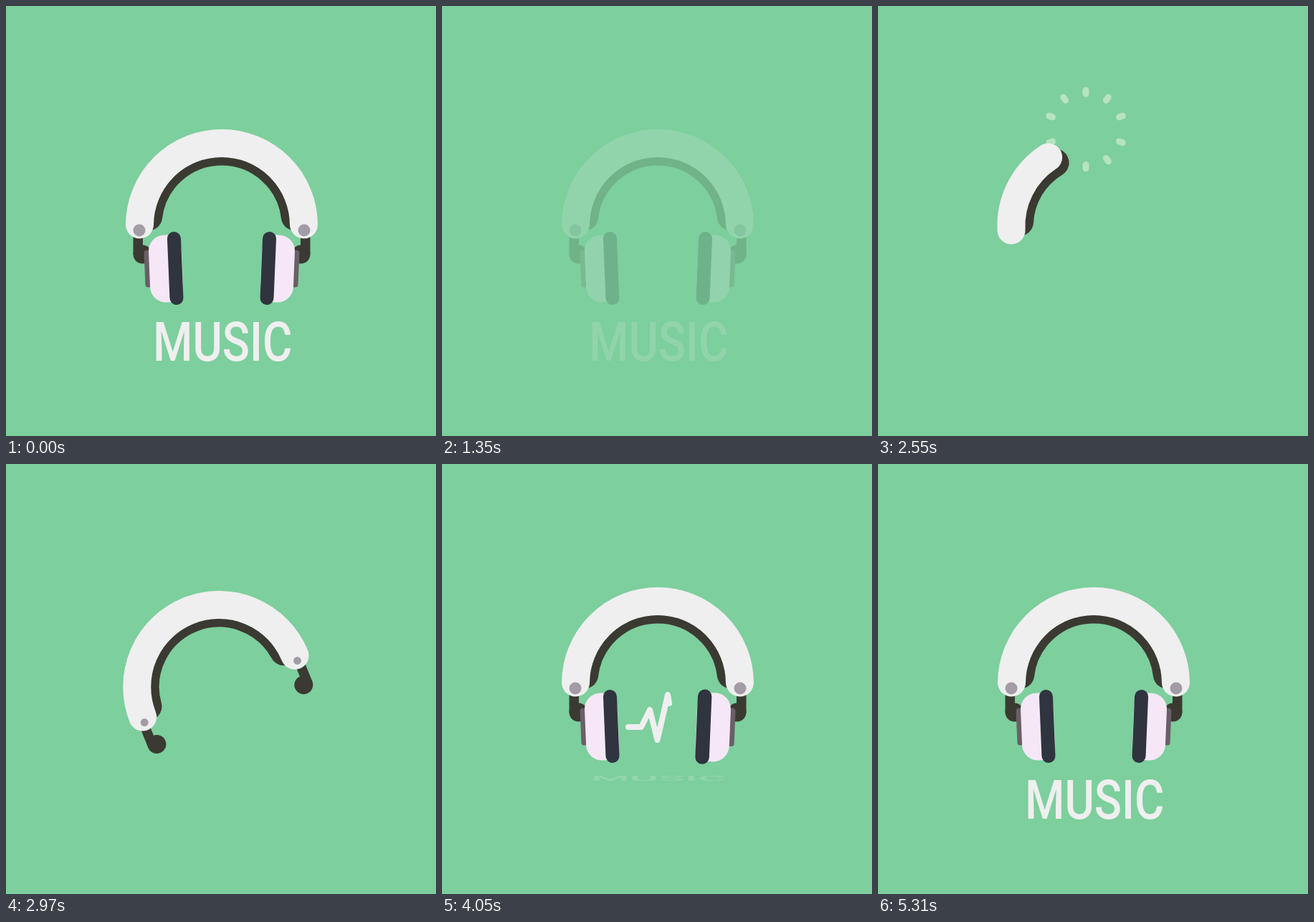
These frames come from a looping animation (600 px wide and 600 px high, 5340 ms). An HTML page:

```html
<!DOCTYPE html>
<html lang="en">
<head>
<meta charset="utf-8">
<title>Music</title>
<style>
  html, body { margin: 0; width: 100%; height: 100%; overflow: hidden; background: #7dcf9d; }
  svg { display: block; width: 100vw; height: 100vh; }
  .band { fill: none; stroke-width: 39; stroke-linecap: round; }
  .dark { stroke: #3b3a32; }
  .light { stroke: #efefef; }
  .wave { fill: none; stroke: #efefef; stroke-width: 8; stroke-linecap: round; stroke-linejoin: round; }
  #burst { stroke: #f0f7e4; stroke-width: 9; stroke-linecap: round; }
  text { font: 500 76.5px Roboto, "Open Sans", sans-serif; fill: #efefef; text-anchor: middle; }
</style>
</head>
<body>
<svg viewBox="0 0 600 600">
  <defs>
    <g id="leg" fill="#3b3a32">
      <rect x="177.5" y="305" width="13.5" height="42"/>
      <circle cx="190.5" cy="346.5" r="13"/>
    </g>
    <circle id="pin" cx="186" cy="313" r="8.5" fill="#a29ca6"/>
    <g id="cup" transform="rotate(-2.4 236 366)">
      <rect x="193.5" y="339" width="16" height="52" rx="4" fill="#6a5f68"/>
      <rect x="200" y="319" width="46" height="94" rx="22" fill="#f5e7f6"/>
      <rect x="226.7" y="315" width="19" height="102" rx="9.5" fill="#2f343f"/>
    </g>
  </defs>
  <g id="all">
    <g id="burst"></g>
    <g id="swing">
      <g id="legs">
        <use href="#leg"/>
        <use href="#leg" transform="translate(602 0) scale(-1 1)"/>
      </g>
      <path id="inner" class="band dark"/>
      <path id="outer" class="band light"/>
      <use href="#pin"/>
      <use href="#pin" transform="translate(602 0) scale(-1 1)"/>
    </g>
    <g id="cupL"><use href="#cup"/></g>
    <g transform="translate(602 0) scale(-1 1)"><g id="cupR"><use href="#cup"/></g></g>
    <path id="wave" class="wave" pathLength="100" d="M260 367H278L290 343L300.5 385L315 322L323 367H342"/>
    <g id="label"><text transform="translate(302.2 494.7) scale(.828 1)">MUSIC</text></g>
  </g>
</svg>
<script>
const LOOP = 5340, STEP = 30, CX = 301, CY = 306, REST = 89.5;
const $ = id => document.getElementById(id);
const set = (el, attrs) => {
  for (const name in attrs) el.setAttribute(name, attrs[name]);
};

const linear = u => u;
const quadIn = u => u * u;
const quadOut = u => u * (2 - u);
const sineOut = u => Math.sin(u * Math.PI / 2);
const sineInOut = u => (1 - Math.cos(u * Math.PI)) / 2;
const back = s => u => 1 + (s + 1) * (u - 1) ** 3 + s * (u - 1) ** 2;

function tween(t, start, end, from, to, ease = linear) {
  const u = Math.min(Math.max((t - start) / (end - start), 0), 1);
  return from + (to - from) * ease(u);
}

// Two fans of five rays, one up and one down.
const rays = [];
for (const base of [0, 180]) {
  for (let i = -2; i <= 2; i++) {
    const ray = document.createElementNS("http://www.w3.org/2000/svg", "line");
    set(ray, { transform: `translate(290 172) rotate(${base + i * 35})` });
    $("burst").append(ray);
    rays.push(ray);
  }
}

// Angles run counter-clockwise from the top.
function arc(radius, from, sweep) {
  const point = deg => {
    const a = deg * Math.PI / 180;
    return `${CX - radius * Math.sin(a)} ${CY - radius * Math.cos(a)}`;
  };
  return `M${point(from)}A${radius} ${radius} 0 0 1 ${point(from - Math.max(sweep, .05))}`;
}

const scaleAt = (x, y, sx, sy = sx) =>
  `translate(${x} ${y}) scale(${sx} ${sy}) translate(${-x} ${-y})`;

function drawBand(t) {
  const turn = tween(t, 2052, 2847, 1.5 - REST, 22, sineOut) - tween(t, 3000, 3755, 0, 22, sineInOut);
  const shift = Math.max(turn, 0);
  const sweep = tween(t, 2070, 2900, 0, 179, quadIn);
  set($("swing"), {
    transform: `translate(${-.17 * shift} ${.23 * shift}) rotate(${-turn} ${CX} ${CY})`
  });
  set($("outer"), { d: arc(114.5, REST, sweep) });
  set($("inner"), { d: arc(tween(t, 2070, 2550, 106, 103), 83.3, sweep * .931) });
  set($("legs"), {
    transform: `translate(0 ${tween(t, 2850, 3060, -42, 0, back(1))})`,
    opacity: t > 2850 ? 1 : 0
  });
  set($("pin"), { r: tween(t, 2910, 3060, 0, 8.5, quadOut) });
}

function drawBurst(t) {
  const radius = tween(t, 2130, 2700, 12, 55, quadOut);
  const half = tween(t, 2130, 2700, 7, 1);
  set($("burst"), { opacity: t > 2130 ? tween(t, 2400, 2700, 1, 0) : 0 });
  for (const ray of rays) set(ray, { y1: -radius - half, y2: -radius + half });
}

function drawWave(t) {
  const head = tween(t, 3720, 4155, 0, 100), tail = tween(t, 4110, 4440, 0, 100);
  set($("wave"), {
    "stroke-dasharray": `0 ${tail} ${head - tail} 200`,
    opacity: head > tail ? 1 : 0
  });
}

function draw(time) {
  const held = Math.floor(time / STEP) * STEP;
  const visible = time < 1410 || time >= 1870;
  const alpha = held < 1110 || time >= 1870 ? 1 : tween(held, 1080, 1410, 1, 0);
  set($("all"), { opacity: alpha, visibility: visible ? "visible" : "hidden" });

  const t = time < 1870 ? LOOP : held;
  drawBand(t);
  drawBurst(t);
  drawWave(t);
  set($("cupL"), { transform: scaleAt(197, 335, tween(t, 3390, 3990, 0, 1, back(.8))) });
  set($("cupR"), { transform: scaleAt(197, 335, tween(t, 3600, 4230, 0, 1, back(.8))) });
  const wide = tween(t, 4041, 4380, .97, 1, back(2)), tall = tween(t, 4041, 4380, 0, 1, back(2));
  set($("label"), {
    transform: scaleAt(303, 434, wide, tall),
    opacity: tween(t, 4020, 4170, 0, 1)
  });
}

const begin = performance.now();
function tick() {
  draw((performance.now() - begin) % LOOP);
  requestAnimationFrame(tick);
}
tick();
</script>
</body>
</html>
```
